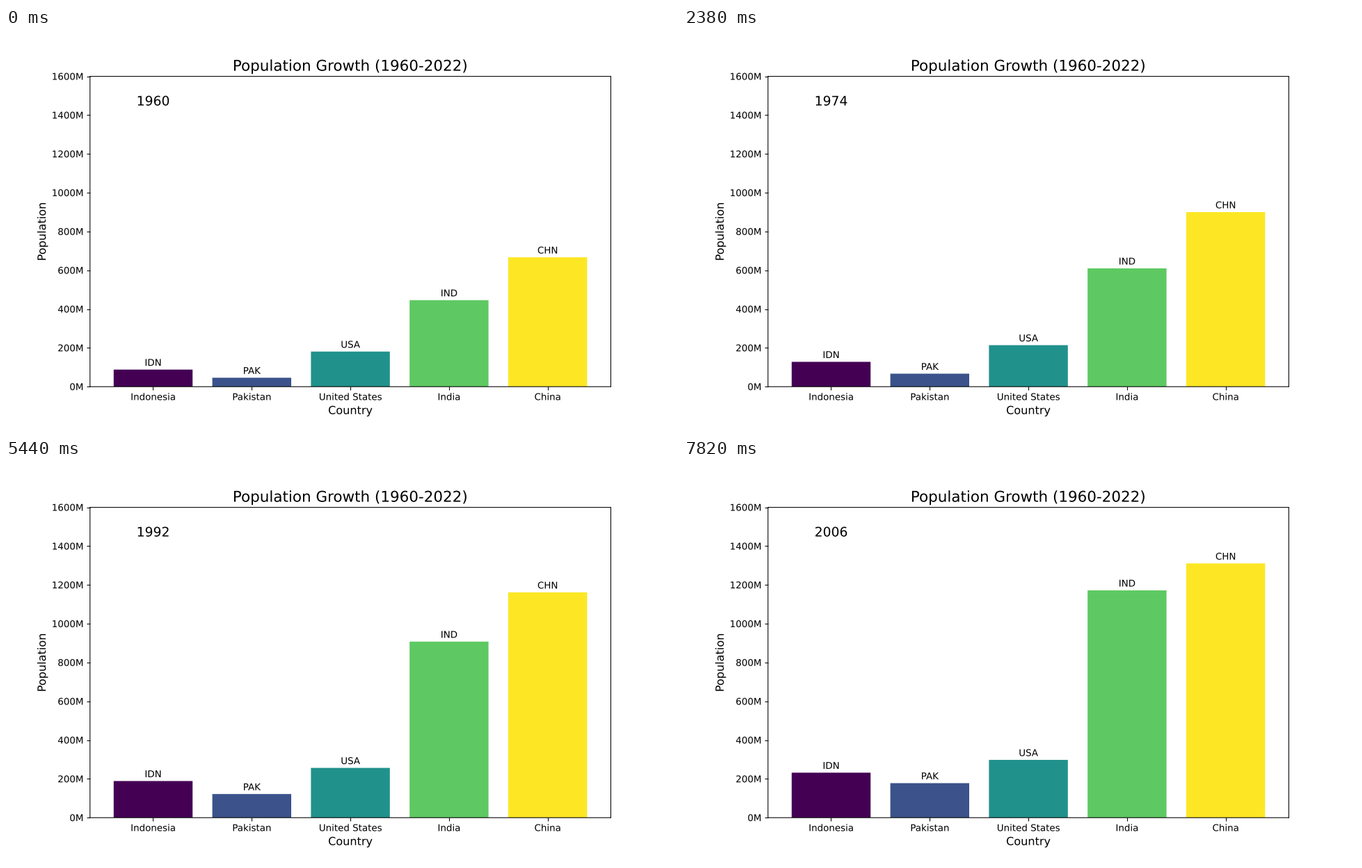
Write a matplotlib script that moves like this. It is 966 by 580 pixels and loops after 7990 ms.

```python
import numpy as np
import matplotlib.pyplot as plt
from matplotlib.animation import FuncAnimation
from matplotlib.patheffects import Normal

WIDTH, HEIGHT, DPI = 966, 580, 96.6
STEP_MS = 170
LABEL_GAP = 10  # millions

# Population in millions at a few key years, joined by smooth curves.
KEY_YEARS = np.array([1960, 1962, 1968, 1974, 1980, 1987, 1996, 2006])
COUNTRIES = {
    ("Indonesia", "IDN"): [88, 93, 109, 128, 148, 172, 202, 232],
    ("Pakistan", "PAK"): [46, 48, 56, 67, 81, 104, 137, 178],
    ("United States", "USA"): [181, 187, 201, 214, 227, 242, 269, 298],
    ("India", "IND"): [446, 467, 533, 610, 697, 816, 983, 1172],
    ("China", "CHN"): [667, 666, 775, 900, 981, 1084, 1218, 1311],
}
POPULATION = np.array(list(COUNTRIES.values()), dtype=float)
SLOPES = np.gradient(POPULATION, KEY_YEARS, axis=1)


def population(year):
    """Cubic Hermite curve through the key years, for all countries."""
    i = min(np.searchsorted(KEY_YEARS, year, side="right"),
            len(KEY_YEARS) - 1) - 1
    span = KEY_YEARS[i + 1] - KEY_YEARS[i]
    t = (year - KEY_YEARS[i]) / span
    start, end = POPULATION[:, i], POPULATION[:, i + 1]
    ease = t * t * (3 - 2 * t)
    bend = (SLOPES[:, i] * (1 - t) - SLOPES[:, i + 1] * t) * t * (1 - t)
    return start + (end - start) * ease + span * bend


# Unhinted outline text and unsnapped edges keep sub-pixel positions.
plt.rcParams.update({
    "font.family": "DejaVu Sans",
    "text.hinting": "none",
    "path.snap": False,
    "path.effects": [Normal()],
})

# The small margin keeps the pixel size from rounding down.
fig, ax = plt.subplots(
    figsize=((WIDTH + 1e-6) / DPI, (HEIGHT + 1e-6) / DPI), dpi=DPI)

names = [name for name, _ in COUNTRIES]
colors = plt.get_cmap("viridis")(np.linspace(0, 1, len(names)))
bars = ax.bar(names, POPULATION[:, 0], color=colors)
labels = [ax.text(i, 0, code, ha="center", va="bottom")
          for i, (_, code) in enumerate(COUNTRIES)]
year_text = ax.text(0, 1450, "", ha="center", fontsize=14)

ax.set_ylim(0, 1600)
ticks = range(0, 1601, 200)
ax.set_yticks(ticks, [f"{t}M" for t in ticks])
ax.set_title("Population Growth (1960-2022)", fontsize=16)
ax.set_xlabel("Country", fontsize=12)
ax.set_ylabel("Population", fontsize=12)


def update(frame):
    year = KEY_YEARS[0] + frame
    for bar, label, size in zip(bars, labels, population(year)):
        bar.set_height(size)
        label.set_y(size + LABEL_GAP)
    year_text.set_text(str(year))
    return [*bars, *labels, year_text]


anim = FuncAnimation(fig, update, frames=KEY_YEARS[-1] - KEY_YEARS[0] + 1,
                     interval=STEP_MS, repeat=True, blit=False)
plt.show()
```
